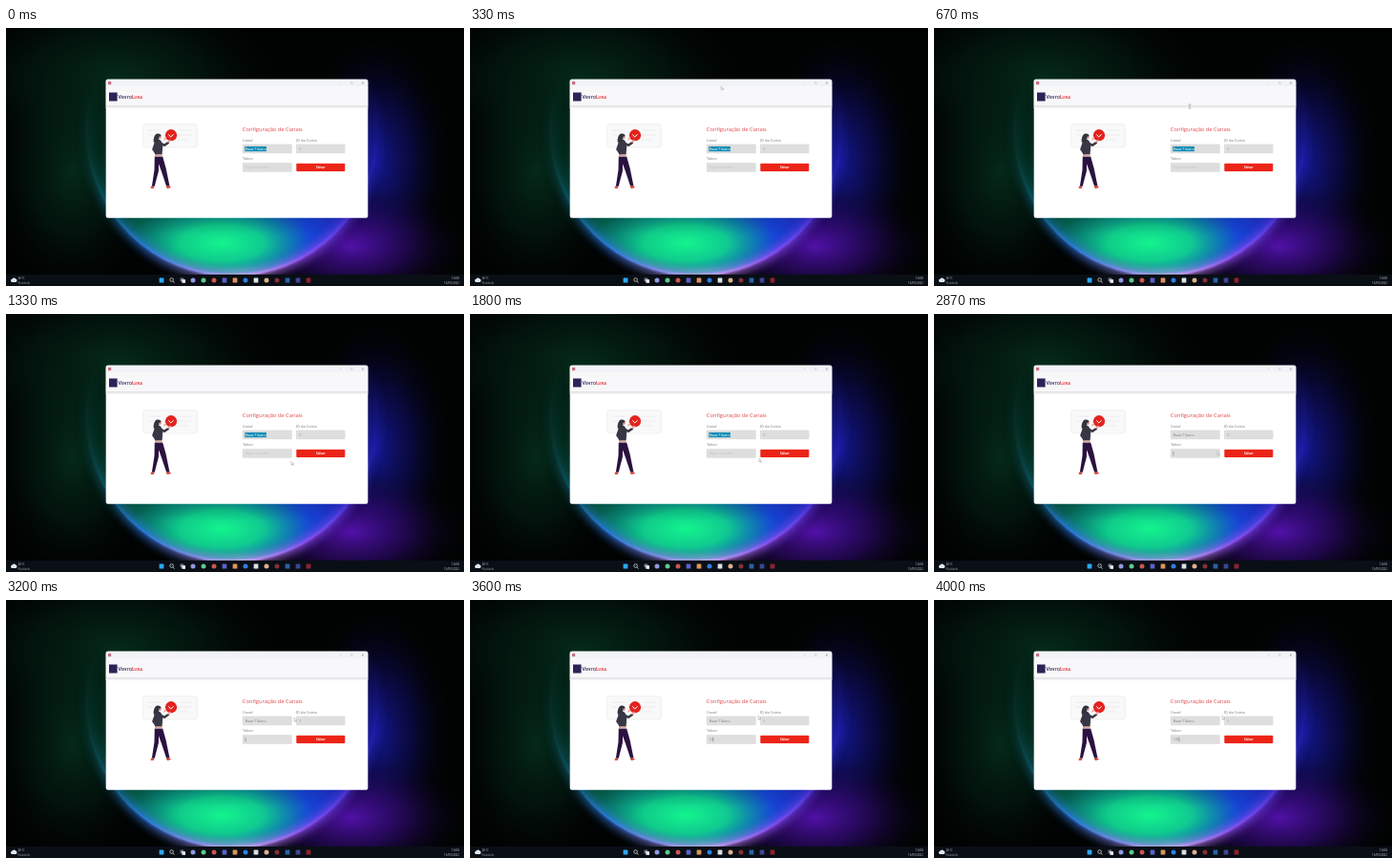
An HTML page for the animation above (4070 ms loop, 480x270 px).

```html
<!DOCTYPE html>
<html lang="pt-BR">
<head>
<meta charset="utf-8">
<title>Configuração de Canais</title>
<style>
html, body { margin: 0; width: 100%; height: 100%; overflow: hidden; background: #010303; }
svg { display: block; width: 100vw; height: 100vh; }
text { font-family: "Open Sans", "Noto Sans", sans-serif; font-size: 4px; fill: #777; }
.brand { font: small-caps bold 5px Lato, sans-serif; fill: #292357; }
.bar { font-size: 3.2px; fill: #c5cbd2; }
.field { fill: #dedede; stroke: #d4d4d4; stroke-width: .3; }
</style>
</head>
<body>
<svg viewBox="0 0 480 270" preserveAspectRatio="none">
  <defs>
    <radialGradient id="green"><stop offset="0" stop-color="#063a22"/><stop offset=".55" stop-color="#042517" stop-opacity=".65"/><stop offset="1" stop-color="#02100a" stop-opacity="0"/></radialGradient>
    <radialGradient id="blue"><stop offset="0" stop-color="#1a1fc0"/><stop offset=".5" stop-color="#120f78" stop-opacity=".65"/><stop offset="1" stop-color="#06042c" stop-opacity="0"/></radialGradient>
    <radialGradient id="violet"><stop offset="0" stop-color="#5a12b8"/><stop offset=".5" stop-color="#330a78" stop-opacity=".65"/><stop offset="1" stop-color="#10042c" stop-opacity="0"/></radialGradient>
    <radialGradient id="core"><stop offset="0" stop-color="#14f48e"/><stop offset=".45" stop-color="#10d98c" stop-opacity=".85"/><stop offset="1" stop-color="#0a8ca0" stop-opacity="0"/></radialGradient>
    <linearGradient id="orb">
      <stop offset="0" stop-color="#04402f"/>
      <stop offset=".3" stop-color="#08806c"/>
      <stop offset=".55" stop-color="#0c7fa8"/>
      <stop offset=".75" stop-color="#1545d8"/>
      <stop offset="1" stop-color="#2418a8"/>
    </linearGradient>
    <linearGradient id="rim">
      <stop offset="0" stop-color="#0b6b70"/>
      <stop offset=".2" stop-color="#2f78e8"/>
      <stop offset=".38" stop-color="#9a8cf4"/>
      <stop offset=".52" stop-color="#eab4fa"/>
      <stop offset=".75" stop-color="#9a55f4"/>
      <stop offset="1" stop-color="#2a2ee0"/>
    </linearGradient>
    <linearGradient id="fade" x2="0" y2="1">
      <stop offset=".2" stop-color="#000"/>
      <stop offset=".5" stop-color="#555"/>
      <stop offset=".8" stop-color="#fff"/>
    </linearGradient>
    <mask id="low" maskUnits="userSpaceOnUse" x="0" y="0" width="480" height="270"><rect width="480" height="270" fill="url(#fade)"/></mask>
    <clipPath id="sphere"><circle cx="237" cy="107" r="153"/></clipPath>
    <filter id="soft" x="-20%" y="-20%" width="140%" height="140%"><feGaussianBlur stdDeviation="5"/></filter>
    <filter id="fine" x="-20%" y="-20%" width="140%" height="140%"><feGaussianBlur stdDeviation="1.2"/></filter>
  </defs>

  <ellipse cx="115" cy="55" rx="165" ry="90" fill="url(#green)" opacity=".75"/>
  <ellipse cx="70" cy="150" rx="80" ry="120" fill="url(#green)" opacity=".7"/>
  <ellipse cx="388" cy="140" rx="75" ry="125" fill="url(#blue)" opacity=".75"/>
  <ellipse cx="362" cy="228" rx="115" ry="62" fill="url(#violet)" opacity=".9"/>
  <g mask="url(#low)">
    <g clip-path="url(#sphere)">
      <circle cx="237" cy="107" r="153" fill="url(#orb)"/>
      <ellipse cx="226" cy="225" rx="98" ry="42" fill="url(#core)"/>
    </g>
    <g fill="none" stroke="url(#rim)">
      <circle cx="237" cy="107" r="152" stroke-width="9" filter="url(#soft)" opacity=".75"/>
      <circle cx="237" cy="107" r="152" stroke-width="2.6" filter="url(#fine)" opacity=".85"/>
    </g>
  </g>

  <rect x="104.7" y="53.7" width="274.6" height="145" rx="2" fill="#fff"/>
  <path d="M104.7 61.5V55.7q0-2 2-2h270.6q2 0 2 2v5.8z" fill="#f1f3f8"/>
  <rect x="104.7" y="61.5" width="274.6" height="20" fill="#f8f8fa"/>
  <rect x="104.7" y="81.3" width="274.6" height="1.3" fill="#d9d9dd"/>
  <rect x="104.7" y="82.6" width="274.6" height="1.5" fill="#f3f3f5"/>
  <rect x="107" y="56" width="3.2" height="3.2" fill="#c8707e"/>
  <path d="M350 57.6h2M361.2 56.6h1.9v1.9h-1.9z" fill="none" stroke="#bbb" stroke-width=".4"/>
  <path d="M372.8 56.5l2.2 2.2m0-2.2l-2.2 2.2" stroke="#777" stroke-width=".45"/>
  <rect x="108" y="67.5" width="8.6" height="9" fill="#292357"/>
  <text class="brand" x="117.6" y="74.2">Vento<tspan fill="#e32936">Lura</tspan></text>

  <g id="picture">
    <rect x="143" y="100" width="58" height="25.5" rx="4" fill="#f2f2f4"/>
    <rect x="144.2" y="101.2" width="55.6" height="23.1" rx="3.2" fill="#f9f9fa"/>
    <path d="M149 107h13M149 112h6M181 107h13M181 112h13M181 117h9" stroke="#ebebee" stroke-width="1.2" stroke-linecap="round"/>
    <circle cx="173" cy="112.2" r="6.1" fill="#e4231f"/>
    <path d="M170.4 111.4l2.2 2.6 3-2.6" fill="none" stroke="#fff" stroke-width="1"/>
    <path d="M155.8 134.5h8.4l3.4 12 3.8 18.5-3.2.8-5.4-16-2.7-7.5-.2 7.5-4.2 16-2.8-.4 2.6-17z" fill="#2a1240"/>
    <path d="M152.4 165.3l3 .5-.6 2h-3.4zM167.8 165.9l3.4-.9 1.8 2-4 1z" fill="#dc3a2c"/>
    <path d="M156 118q3-2.8 6.2-.2l2.2 4.1-.8 10.6h-7.4l-1.6-8z" fill="#373745"/>
    <path d="M157 120l-2.6 7 3.2 4.2" fill="none" stroke="#373745" stroke-width="2.4" stroke-linecap="round" stroke-linejoin="round"/>
    <path d="M162 120.5l4 2.2 4-2.8" fill="none" stroke="#373745" stroke-width="2.4" stroke-linecap="round" stroke-linejoin="round"/>
    <path d="M170 119.4l2.2-1.8M166 116.6l1.6-1.6" stroke="#e6a99b" stroke-width="1.5" stroke-linecap="round"/>
    <circle cx="160.4" cy="113.8" r="2.4" fill="#c98f86"/>
    <path d="M154.6 119.5q-.2-7 3.4-8.9 3.5-.8 4.7 2l-2.6 1.6-.3 5.3z" fill="#34343f"/>
    <path d="M156 133.4h7.8" stroke="#e5a79a" stroke-width="1.5"/>
  </g>

  <text x="247.8" y="108.3" style="font-size:5.75px;fill:#e54444">Configuração de Canais</text>
  <text x="248" y="119.3">Canal</text>
  <text x="304" y="119.3">ID da Conta</text>
  <text x="248" y="138.2">Token</text>
  <rect class="field" x="248" y="121.7" width="51.5" height="9.3" rx=".8"/>
  <rect class="field" x="304.2" y="121.7" width="51" height="9.3" rx=".8"/>
  <rect class="field" x="248" y="141.2" width="51.5" height="9.3" rx=".8"/>
  <rect id="selection" x="250.3" y="123.9" width="22.6" height="5.2" fill="#138bb4"/>
  <text id="channel" x="250.7" y="127.9" style="font-size:3.5px">Bazar Tilvano</text>
  <text x="307" y="127.9" style="font-size:3.6px">1</text>
  <text id="token" x="250.7" y="147.3" style="font-size:3.4px"></text>
  <path id="caret" d="M0 143.6v4.8" stroke="#666" stroke-width=".5"/>
  <rect x="304.3" y="141.7" width="51" height="8.3" rx=".9" fill="#ec2418"/>
  <text x="329.8" y="147" text-anchor="middle" style="font-size:3.2px;font-weight:700;fill:#fff">Salvar</text>

  <rect y="258" width="480" height="12" fill="#0a0e15"/>
  <path d="M6 266a1.7 1.7 0 0 1 .2-3.2 2.2 2.2 0 0 1 4-.2 1.8 1.8 0 0 1 .2 3.4z" fill="#dce6f0"/>
  <text class="bar" x="12.5" y="263.3">26°C</text>
  <text class="bar" x="12.5" y="267.7" style="fill:#8f979f">Nublado</text>
  <g id="apps"></g>
  <g fill="none" stroke="#d4d8dc" stroke-width=".8">
    <circle cx="173.6" cy="263.5" r="1.8"/><path d="M175 265l1.5 1.6"/>
  </g>
  <path d="M182.6 261.6h3.6v3.6h-3.6z" fill="#777f88"/><path d="M184.4 263.2h3.6v3.6h-3.6z" fill="#eef1f4"/>
  <g text-anchor="end">
    <text class="bar" x="475" y="263.3">14:08</text>
    <text class="bar" x="475" y="267.7" style="font-size:3px">16/09/2022</text>
  </g>

  <g id="pointer">
    <path id="arrow" d="M-1-1.8v3.8l1-.8.6 1.3.6-.3-.6-1.2h1.2z" fill="#fff" stroke="#888" stroke-width=".4"/>
    <path id="resize" d="M0-2.5v5M-1-1.5l1-1 1 1M-1 1.5l1 1 1-1" fill="none" stroke="#888" stroke-width=".6"/>
  </g>
</svg>
<script>
const LOOP = 4070, CLICK = 2600;
const $ = id => document.getElementById(id);
const show = (id, on) => $(id).setAttribute("visibility", on ? "visible" : "hidden");

const apps = [
  [163, "#2ba8ef", 1], [196, "#8f9be0"], [207, "#5fc98a"], [218, "#c9584e"],
  [229, "#5961c8", 1], [240, "#d8955a", 1], [251, "#2f7fe0"], [262, "#dce0e5", 1],
  [273, "#e0b08c"], [284, "#8a2c3a"], [295, "#2c5fa8", 1], [306, "#3d4496", 1], [317, "#8f2030", 1]
];
$("apps").innerHTML = apps.map(([x, color, square]) => square
  ? `<rect x="${x - 2.4}" y="261.6" width="4.8" height="4.8" rx=".5" fill="${color}"/>`
  : `<circle cx="${x}" cy="264" r="2.5" fill="${color}"/>`
).join("");

// Pointer stops: time, x, y
const stops = [
  [300, 264, 62], [600, 268, 82], [760, 268, 82], [1220, 300, 156], [1400, 300, 156],
  [1750, 304, 153], [1950, 304, 153], [2240, 297, 149.5], [2780, 297, 149.5],
  [3130, 303, 125], [3300, 303, 125], [3500, 303, 123]
];

function pointerAt(t) {
  const next = stops.findIndex(s => s[0] > t);
  if (next < 0) return stops.at(-1).slice(1);
  if (next === 0) return stops[0].slice(1);
  const [t0, x0, y0] = stops[next - 1], [t1, x1, y1] = stops[next];
  const p = (t - t0) / (t1 - t0), ease = p * p * (3 - 2 * p);
  return [x0 + (x1 - x0) * ease, y0 + (y1 - y0) * ease];
}

function draw(t) {
  const [x, y] = pointerAt(t);
  const focused = t >= CLICK;
  const onEdge = Math.abs(y - 82) < 3;
  $("pointer").setAttribute("transform", `translate(${x} ${y})`);
  show("arrow", t >= 300 && !onEdge);
  show("resize", t >= 300 && onEdge);

  show("selection", !focused);
  $("channel").style.fill = focused ? "#808080" : "#fff";
  const typed = "123".slice(0, Math.max(0, Math.floor((t - 3300) / 150)));
  $("token").textContent = focused ? typed : "Digite seu token";
  $("token").style.fill = focused ? "#777" : t < 2200 ? "#c2c2c2" : "#adadad";
  show("caret", focused && (t > 3400 || (t - CLICK) % 1060 < 700));
  $("caret").setAttribute("transform", `translate(${251 + typed.length * 1.95} 0)`);
}

const start = performance.now();
function tick() {
  draw((performance.now() - start) % LOOP);
  requestAnimationFrame(tick);
}
tick();
</script>
</body>
</html>
```
